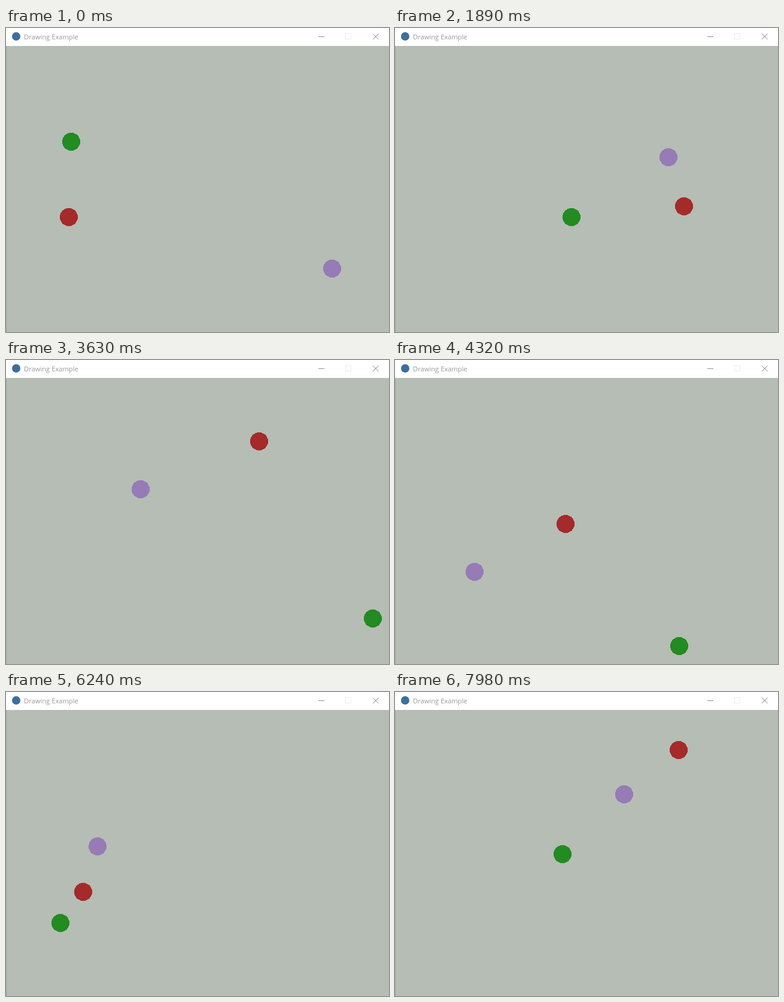
An HTML page for the animation above (8 s loop, 640 by 508 pixels).

```html
<!DOCTYPE html>
<html lang="en">
<head>
<meta charset="utf-8">
<title>Drawing Example</title>
<style>
  html, body { margin: 0; width: 100%; height: 100%; overflow: hidden; background: #fff; }
  svg { display: block; width: 640px; height: 508px; }
  text { font: 11.2px "Open Sans", "Noto Sans", sans-serif; fill: #999; }
</style>
</head>
<body>
<svg viewBox="0 0 640 508">
  <rect width="640" height="508" fill="#fff"/>
  <circle cx="17" cy="14" r="7" fill="#3c6e9e"/>
  <text x="30" y="19">Drawing Example</text>
  <g fill="none">
    <path d="M522 14.5h10" stroke="#8c8c8c"/>
    <rect x="567.5" y="9.5" width="9" height="9" stroke="#ebebeb"/>
    <path d="M613 9.5l9.5 9.5M622.5 9.5l-9.5 9.5" stroke="#808080"/>
  </g>
  <rect y="30" width="640" height="478" fill="#b5bdb4"/>
  <rect y="30" width="1" height="478" fill="#a0a5a0"/>
  <clipPath id="view"><rect x="1" y="30" width="639" height="478"/></clipPath>
  <g id="balls" clip-path="url(#view)" shape-rendering="crispEdges"></g>
</svg>
<script>
const LOOP = 8000, STEP = 30, MOVES = 532;
const SKIP_STEP = 226; // one half-step is lost here
const WALLS = { left: 16, right: 626, top: 45, bottom: 495 };

const balls = [
  { x: 109, y: 190, dx: -3, dy: 1, color: '#228b22' },
  { x: 105, y: 316, dx: 3, dy: 3, color: '#a52a2a' },
  { x: 545, y: 402, dx: 2, dy: 3, color: '#967bb6' }
];

// Positions along one axis; a ball turns after it has passed a wall.
function bouncePath(pos, speed, low, high) {
  const path = [pos];
  for (let i = 0; i < MOVES; i++) {
    pos += speed;
    if ((pos < low && speed < 0) || (pos > high && speed > 0)) speed = -speed;
    path.push(pos);
  }
  return path;
}

const group = document.getElementById('balls');
for (const ball of balls) {
  ball.xs = bouncePath(ball.x, ball.dx, WALLS.left, WALLS.right);
  ball.ys = bouncePath(ball.y, ball.dy, WALLS.top, WALLS.bottom);
  ball.node = document.createElementNS('http://www.w3.org/2000/svg', 'circle');
  ball.node.setAttribute('r', 15);
  ball.node.setAttribute('fill', ball.color);
  group.append(ball.node);
}

function draw(time) {
  const step = Math.floor((time % LOOP) / STEP + 1e-6);
  // The first picture is held for two steps.
  const move = step < 2 ? 0 : 2 * step - (step >= SKIP_STEP ? 1 : 0);
  for (const { node, xs, ys } of balls) {
    node.setAttribute('cx', xs[move]);
    node.setAttribute('cy', ys[move]);
  }
}

const start = performance.now();
function tick() {
  draw(performance.now() - start);
  requestAnimationFrame(tick);
}
tick();
</script>
</body>
</html>
```
